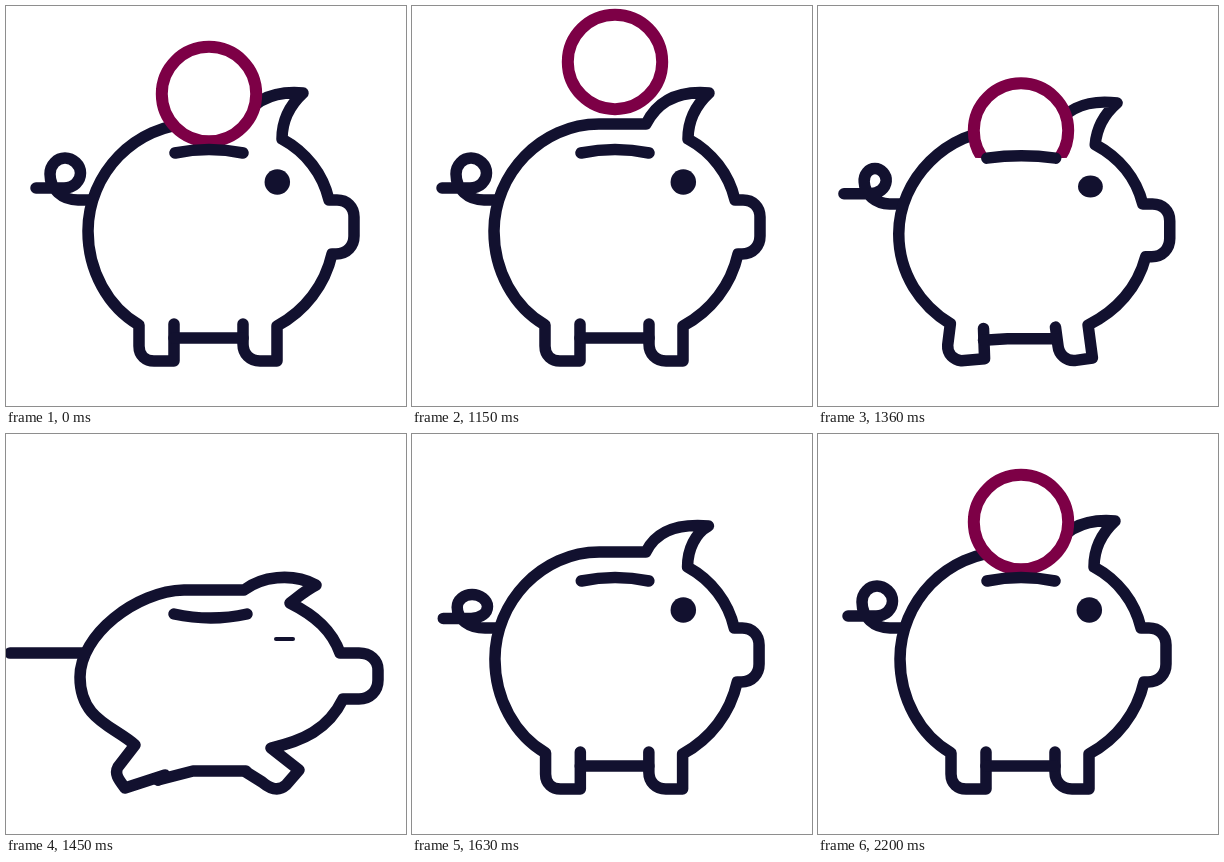
Write an HTML page that moves like this. It is 400 px wide and 400 px high and loops after 2.23 s.

```html
<!DOCTYPE html>
<html lang="en">
<head>
<meta charset="utf-8">
<title>Piggy bank</title>
<style>
html, body { margin: 0; width: 100%; height: 100%; overflow: hidden; background: #fff; }
svg { display: block; width: 100vw; height: 100vh; }
.line { fill: none; stroke: #12112f; stroke-width: 11.5; stroke-linecap: round; stroke-linejoin: round; }
</style>
</head>
<body>
<svg viewBox="0 0 400 400">
  <clipPath id="above"><path id="mask"/></clipPath>
  <path id="tail" class="line"/>
  <path id="body" class="line"/>
  <path id="belly" class="line"/>
  <g clip-path="url(#above)">
    <circle id="coin" cx="203" fill="#fff" stroke="#7d0046"/>
  </g>
  <path id="slot" class="line"/>
  <rect id="eye" fill="#12112f"/>
</svg>
<script>
const LOOP = 2230, START = 1030, STEP = 30;
const $ = id => document.getElementById(id);

// Each part: resting pose and flattened pose, with the same commands.
const parts = {
  body: [
    'M168,318 L168,355 L148,355 C140,355 133,350 133,340 L133,319 ' +
    'C102,301 82,265 82,225 C82,168 129,118 187,118 L234,118 ' +
    'C243,100 261,84 297,87 C284,99 276,115 276,133 ' +
    'C300,146 317,168 323,194 L331,194 C341,194 348,201 348,211 ' +
    'L348,230 C348,240 341,248 330,248 L326,248 ' +
    'C319,279 299,305 271,320 L271,355 L254,355 ' +
    'C244,355 237,348 237,338 L237,318',
    'M152,346 L159,341 L119,354 C113,346 108,340 112,333 L129,311 ' +
    'C108,292 74,286 74,243 C74,201 130,157 178,156 L238,156 ' +
    'C255,143 285,138 310,151 C300,156 292,163 284,169 ' +
    'C310,182 326,197 334,219 L353,219 C364,219 372,226 372,236 ' +
    'L372,246 C372,257 364,265 353,265 L337,265 ' +
    'C322,296 296,307 265,314 L293,336 L280,351 ' +
    'C271,359 262,353 256,348 L240,338'
  ],
  belly: ['M168,332 L190,332 L237,332', 'M152,346 L187,337 L240,337'],
  slot: ['M169,147 Q203,140 237,147', 'M168,180 Q205,188 241,180'],
  tail: [
    'M30,182 L58,182 C68,182 74.5,175 74.5,167 C74.5,159 67,152 59,152 ' +
    'C51,152 44,159 44,168 C44,183 56,194 72,194 L86,194',
    'M4,219 L20,219 C25,219 30,219 34,219 C38,219 42,219 46,219 ' +
    'C50,219 54,219 58,219 C62,219 66,219 70,219 L77,219'
  ]
};

const nums = s => s.match(/[\d.]+/g).map(Number);
const mix = (a, b, k) => a + (b - a) * k;
const clamp = v => Math.min(1, Math.max(0, v));
const ramp = (t, a, b) => clamp((t - a) / (b - a));
const smooth = v => v * v * (3 - 2 * v);

// Small leftover bend of the resting pose while it settles.
function settle(id, x, y, q) {
  if (id === 'tail') y = 194 - (194 - y) * (1 - 0.2 * q);
  else if (id === 'body' && y < 95) y += 5 * q;
  return [215 + (x - 215) * (1 - 0.007 * q), y];
}

function shape(id, p, q) {
  const [rest, flat] = parts[id];
  const a = nums(rest), b = nums(flat);
  for (let i = 0; i < a.length; i += 2) {
    const [x, y] = settle(id, a[i], a[i + 1], q);
    a[i] = mix(x, b[i], p);
    a[i + 1] = mix(y, b[i + 1], p);
  }
  let i = 0;
  return rest.replace(/[\d.]+/g, () => a[i++].toFixed(2));
}

// Centre height and scale of the coin, or null while it is inside.
function coinAt(t) {
  if (t < START) return [88, 1];
  if (t < 1300) return [55.5 + 0.00122 * (t - 1169) ** 2, 1];
  if (t < 1420) {
    const d = t - 1300;
    return [76.5 + 0.35 * d + 0.0075 * d * d, 1];
  }
  if (t < 1840) return null;
  if (t < 2000) {
    const d = 2000 - t;
    return [67 + 0.0048 * d * d, 1 - 0.03 * (d / 70) ** 2];
  }
  return [67 + 21 * Math.sin(ramp(t, 2000, 2200) * Math.PI / 2), 1];
}

function draw(t) {
  const p = smooth(ramp(t, 1330, 1450)) * (1 - smooth(ramp(t, 1455, 1540)));
  const q = t < 1540 ? 2 * ramp(t, 1450, 1540)
    : t < 1630 ? 2 - ramp(t, 1540, 1630)
    : 1 - ramp(t, 1630, 1730);

  for (const id in parts) $(id).setAttribute('d', shape(id, p, q));
  $('mask').setAttribute('d',
    shape('slot', p, q).replace('M', 'M0,-50 L0,147 L') + ' L400,147 L400,-50 Z');

  const w = mix(25.5, 21, p), h = mix(25.5, 4, p);
  const eye = {
    x: mix(271.3, 278.5, p) - w / 2, y: mix(176, 205, p) - h / 2,
    width: w, height: h, rx: w / 2, ry: h / 2
  };
  if (p > 0.5) eye.rx = h / 2;
  for (const k in eye) $('eye').setAttribute(k, eye[k]);

  const c = coinAt(t), coin = $('coin');
  coin.style.display = c ? '' : 'none';
  if (c) {
    coin.setAttribute('cy', c[0]);
    coin.setAttribute('r', 47.2 * c[1]);
    coin.setAttribute('stroke-width', 12 * c[1]);
  }
}

const t0 = performance.now();
function tick() {
  const t = (performance.now() - t0) % LOOP;
  draw(t < START ? 0 : START + Math.floor((t - START) / STEP) * STEP);
  requestAnimationFrame(tick);
}
tick();
</script>
</body>
</html>
```
